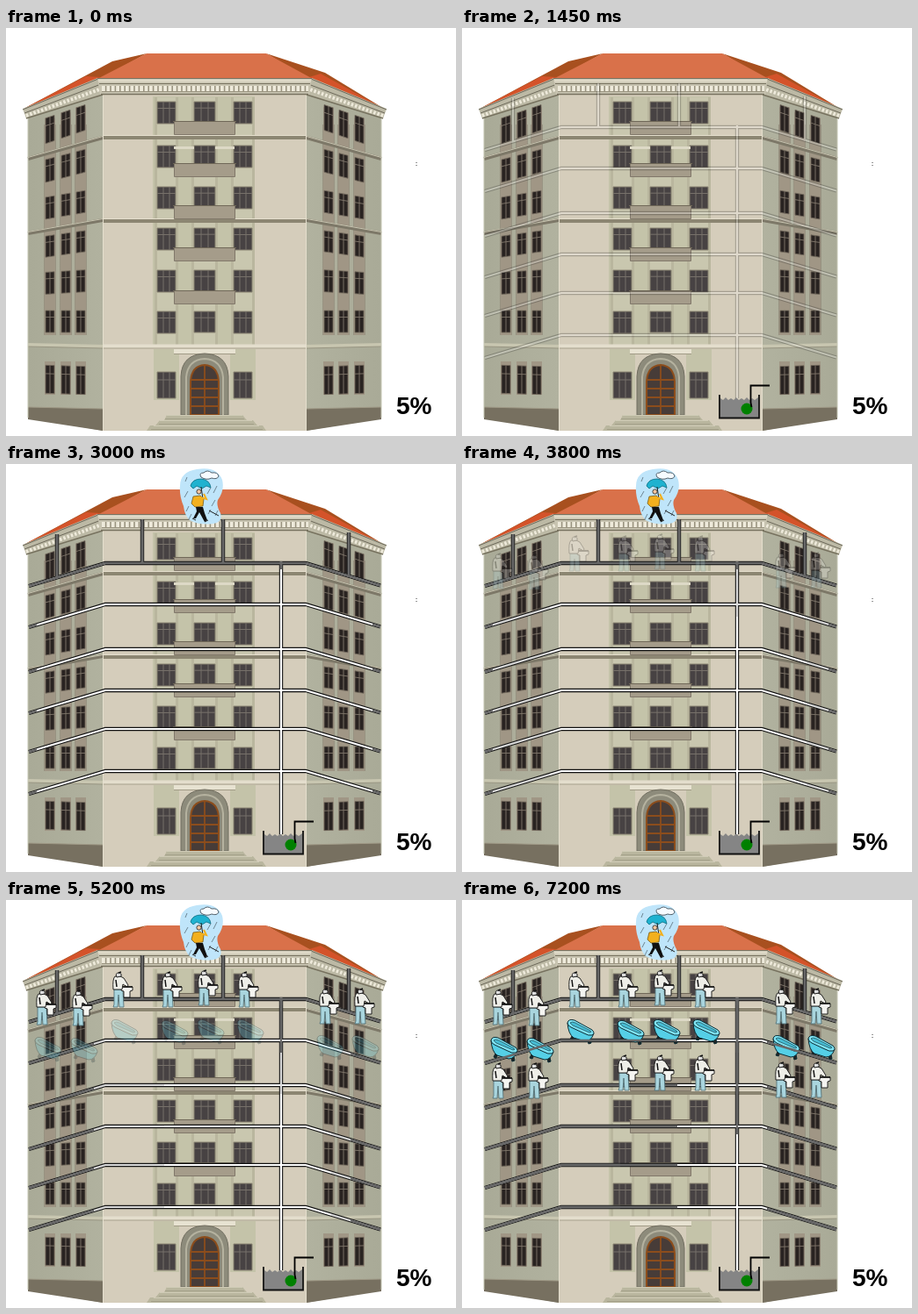
An HTML page for the animation above (8000 ms loop, 512 by 465 pixels).

```html
<!DOCTYPE html>
<html lang="en">
<head>
<meta charset="utf-8">
<title>Building drainage</title>
<style>
  html, body { margin: 0; width: 100%; height: 100%; overflow: hidden; background: #fff; }
  svg { display: block; width: 512px; height: 465px; }
  .layer { opacity: 0; animation: 8s linear infinite; }
  #tank { animation-name: tank; }
  #pipes { animation-name: pipes; }
  #rain { animation-name: rain; }
  #basins { animation-name: basins; }
  #baths { animation-name: baths; }
  #lower { animation-name: lower; }
  /* Each layer fades in with four hard steps, the first one at once. */
  @keyframes tank { 0% { opacity: 0 } 6.24% { opacity: 0; animation-timing-function: steps(4, start) } 8.74%, 100% { opacity: 1 } }
  @keyframes pipes { 0% { opacity: 0 } 18.115% { opacity: 0; animation-timing-function: steps(4, start) } 20.615%, 100% { opacity: 1 } }
  @keyframes rain { 0% { opacity: 0 } 29.99% { opacity: 0; animation-timing-function: steps(4, start) } 39.99%, 100% { opacity: 1 } }
  @keyframes basins { 0% { opacity: 0 } 47.49% { opacity: 0; animation-timing-function: steps(4, start) } 57.49%, 100% { opacity: 1 } }
  @keyframes baths { 0% { opacity: 0 } 64.99% { opacity: 0; animation-timing-function: steps(4, start) } 74.99%, 100% { opacity: 1 } }
  @keyframes lower { 0% { opacity: 0 } 82.49% { opacity: 0; animation-timing-function: steps(4, start) } 92.49%, 100% { opacity: 1 } }
  text { font: bold 28px "Liberation Sans", Arial, sans-serif; }
</style>
</head>
<body>
<svg viewBox="0 0 512 465" fill="none">
  <defs>
    <linearGradient id="wall"><stop stop-color="#a9aa97"/><stop offset="1" stop-color="#b1b29f"/></linearGradient>

    <g id="washer" stroke="#111" stroke-width=".9" stroke-linejoin="round">
      <path d="M-5 19L-5 36L-6 39L-1 39L0 25L1 39L6 39L5 19Z" fill="#a9d5de" stroke="#56757c"/>
      <path d="M3 16H16V20L13 21V28H6V21L3 20Z" fill="#f4f4f0"/>
      <path d="M-4 4Q-7 7-6 19H4L5 13L10 16L11 14L6 6L2 4Z" fill="#eeeee8"/>
      <path d="M-2 5Q-4 0 0 0Q4 0 3 4Z" fill="#ddd"/>
      <path d="M0 0L3-1M-3 8L-2 16M5 16H16" stroke-width="1.5"/>
    </g>

    <g id="bath" stroke="#0b2b33" stroke-linejoin="round">
      <path d="M-10 6L-12 10L-9 11L-7 7M8 11L9 15L12 14L11 9" fill="#222"/>
      <path d="M-15-9Q-14 4-8 8L5 12Q12 12 15 3Z" fill="#55cfe6"/>
      <path d="M-15-9Q-14-14-7-12L13-1Q17 3 13 5Q9 6 4 3L-11-4Q-15-6-15-9Z" fill="#7fe3f3"/>
      <path d="M-12-9Q-10-11-6-9L11 0Q13 2 10 2L-9-6Z" fill="#48bdd4" stroke-width=".6"/>
    </g>
  </defs>

  <!-- roof -->
  <path d="M160 29L121 38L20 92L104 60Z" fill="#a8501f"/>
  <path d="M296 29L363 51L432 93L348 60Z" fill="#a8501f"/>
  <path d="M91 55L24 90L104 63L107 56Z" fill="#d4532a"/>
  <path d="M358 52L428 91L348 63L345 56Z" fill="#d4532a"/>
  <path d="M160 29H296L351 59H102Z" fill="#d9714a"/>

  <g id="side">
    <path d="M25 96L110 70V459L25 444Z" fill="url(#wall)"/>
    <g id="sideWin"></g>
    <path d="M25 432L110 434V459L25 446Z" fill="#777060"/>
    <path d="M25 432L110 434" stroke="#a09a87"/>
    <path d="M25 149L110 125M25 234L110 219" stroke="#7d7868" stroke-width="4"/>
    <path d="M25 147.500L110 123.500M25 232.500L110 217.500" stroke="#c9c5b1"/>
    <path d="M25 361L110 363" stroke="#c8c6b0" stroke-width="4"/>
    <path d="M25 363L110 365" stroke="#989582"/>
    <path d="M19 92L104 57L110 60V76L23 103Z" fill="#bcb9a5"/>
    <path d="M19 93L105 58M21 97L108 64" stroke="#6d695a"/>
    <path d="M23 100L109 69" stroke="#eeeadb" stroke-width="4" stroke-dasharray="2.500 2"/>
    <path d="M23 103L110 76" stroke="#77725f" stroke-width="1.500"/>
    <path d="M25 103V444" stroke="#c6c7b4"/>
  </g>
  <use href="#side" transform="matrix(-1 0 0 1 452 0)"/>

  <!-- front -->
  <path d="M110 73H342V459H110Z" fill="#d5cdbb"/>
  <path d="M167 78H283V361H167Z" fill="#c4c3a9"/>
  <g id="frontWin"></g>
  <path d="M110 125H342M110 220H342" stroke="#8c8672" stroke-width="4"/>
  <path d="M110 122.500H342M110 217.500H342" stroke="#e5dfcd"/>
  <path d="M110 362.500H342" stroke="#e4decd" stroke-width="4"/>
  <path d="M110 365H342" stroke="#aaa48f"/>
  <path d="M104 57H348L345 76H107Z" fill="#c8c4b1"/>
  <path d="M104 57.500H348M106 63.500H346" stroke="#77725f"/>
  <path d="M105 60H347" stroke="#dfdac8" stroke-width="3"/>
  <path d="M109 69.500H344" stroke="#99937f" stroke-width="7"/>
  <path d="M109 69H344" stroke="#eeeadb" stroke-width="6" stroke-dasharray="3.800 1.600"/>
  <path d="M108 75.500H344" stroke="#77725f" stroke-width="1.500"/>
  <path d="M110.500 77V459M341.500 77V459" stroke="#e5dfce"/>
  <path d="M191 136.500H214M238 136.500H260" stroke="#ddd9c6" stroke-width="3"/>
  <g id="balconies" fill="#a59c8a" stroke="#81786a"></g>

  <!-- entrance -->
  <path d="M191 366H261V371H191Z" fill="#e7e2d1"/>
  <path d="M191 371.500H261" stroke="#a19b86"/>
  <path d="M199 441V397Q200 372 226 371Q252 372 253 397V441Z" fill="#8d8b7b" stroke="#716e60"/>
  <path d="M205 441V398Q207 378 226 377Q245 378 247 398V441" stroke="#b5b29f" stroke-width="2"/>
  <path d="M210 441V403Q211 385 226 384Q241 385 242 403V441Z" fill="#473c38" stroke="#8c4d1c" stroke-width="2"/>
  <path d="M226 384V441M210 401H242M210 411H242M210 421H242M210 431H242" stroke="#8c4d1c" stroke-width="1.800"/>
  <path d="M183 441H269L274 447H281L286 453H292L296 459H160L164 453H170L175 447H180Z" fill="#b9b69e"/>
  <path d="M183 441.500H269M175 447.500H280M168 453.500H288" stroke="#cfcbb6"/>
  <path d="M181 445.500H271M174 451.500H282M165 457.500H292" stroke="#a5a18b"/>

  <path d="M466 153.500H468M466 156.500H468" stroke="#999"/>
  <text x="444" y="439.500" fill="#000">5%</text>

  <g id="tank" class="layer">
    <path d="M294 422L297 424L300 421L303 424L306 422L309 424L312 421L315 424L318 422L321 424L324 421L327 424L330 422L333 424L337 421V444H294Z" fill="#858585"/>
    <path d="M293 418V444.500H338V418" stroke="#111" stroke-width="1.800"/>
    <circle cx="324" cy="434" r="6.500" fill="#008000"/>
    <path d="M329.500 432L328.500 427V407.500H350" stroke="#000" stroke-width="1.800"/>
  </g>

  <g id="pipes" class="layer"></g>

  <g id="rain" class="layer">
    <path d="M198 25Q198 9 217 6Q240 2 246 18Q249 30 241 41Q239 47 244 56Q247 66 236 68Q220 70 209 64Q203 58 202 48Q197 36 198 25Z" fill="#bfe5fa"/>
    <path d="M207 31L203 38M208 48L205 54M233 27L229 34M240 25L236 33M238 41L234 48M233 52L230 57M241 53L238 59M211 57L208 63M206 15L204 20" stroke="#6f8794"/>
    <path d="M222 15Q219 10 225 10Q229 6 234 10Q241 9 242 14Q240 18 234 16Q228 19 222 15Z" fill="#f6fbff" stroke="#53616b"/>
    <path d="M210 25Q212 17 222 17Q232 18 233 27L228 25L223 28L217 25L213 28Z" fill="#1fb2d0" stroke="#0a6c80" stroke-width=".8"/>
    <path d="M222 26L224 40" stroke="#222"/>
    <circle cx="219.500" cy="31.500" r="2.600" fill="#f3c6a0" stroke="#222" stroke-width=".8"/>
    <path d="M213 37L221 36L225 40L224 48L215 49L211 45Z" fill="#f2b01e" stroke="#6b4b08" stroke-width=".7"/>
    <path d="M221 38L228 40L225 34" stroke="#f2b01e" stroke-width="2"/>
    <path d="M216 49H224L226 56L229 64L226 66L220 55L216 62L213 62L217 54Z" fill="#111"/>
    <path d="M212 62L216 64M226 66L230 64M231 53L242 59" stroke="#222"/>
  </g>
  <g id="basins" class="layer"></g>
  <g id="baths" class="layer"></g>
  <g id="lower" class="layer"></g>
</svg>
<script>
  const add = (id, html) => document.getElementById(id).insertAdjacentHTML('beforeend', html);
  const line = (d, color, w) => `<path d="${d}" stroke="${color}" stroke-width="${w}"/>`;

  // Side windows: [top, height, slope] per storey.
  const storeys = [[95, 29, -.34], [144, 26, -.26], [189, 25, -.17], [234, 24, -.14],
                   [277, 25, -.06], [322, 25, 0], [385, 32, .03]];
  for (const x of [50, 68, 85]) {
    add('sideWin', `<path d="M${x - 6} ${120 - x * .35}H${x + 6}V350H${x - 6}ZM${x - 6} 380H${x + 6}V418H${x - 6}Z" fill="#a09685"/>`);
    add('sideWin', line(`M${x - 6.5} 110V350M${x + 6.5} 110V350`, '#8f8778', .7));
  }
  for (const [y, h, slope] of storeys) {
    const panes = [-18, 0, 17].map(x =>
      `<path d="M${x - 5} 0H${x + 5}V${h}H${x - 5}Z" fill="#292321" stroke="#756c5f" stroke-width=".8"/>` +
      line(`M${x} 0V${h}M${x - 5} ${h * .3}H${x + 5}`, '#80776b', .9)).join('');
    add('sideWin', `<g transform="matrix(1 ${slope} 0 1 68 ${y})">${panes}</g>`);
  }

  // Front windows and their surrounds.
  const pane = (x, y, w, h) => {
    add('frontWin', `<path d="M${x} ${y}h${w}v${h}h${-w}z" fill="#474243" stroke="#8a8473"/>` +
      line(`M${x + w / 3} ${y}v${h}M${x + w * 2 / 3} ${y}v${h}M${x} ${y + h * .3}h${w}`, '#77716a', 1));
  };
  for (const [x, w] of [[169, 27], [211, 30], [256, 27]])
    add('frontWin', `<path d="M${x} 79h${w}V361h${-w}z" fill="#b9b69e"/>` +
      `<path d="M${x + 3} 79h${w - 6}V361h${6 - w}z" fill="#c9c7af"/>`);
  for (const y of [84, 134, 181, 228, 276, 323]) {
    pane(172, y, 21, 25);
    pane(214, y, 24, 24);
    pane(259, y, 21, 25);
  }
  for (const x of [172, 259]) {
    add('frontWin', `<path d="M${x - 4} 366h29v58h-29z" fill="#c4c3a9"/>`);
    pane(x, 392, 21, 30);
  }
  for (const y of [106, 154, 202, 250, 299])
    add('balconies', `<path d="M191.500 ${y + .5}h69v15h-69z"/><path d="M190 ${y + .5}h72" stroke="#706858"/>`);

  // Pipes.
  const floorPipe = y => `M26 ${y + 26}L113 ${y}H341L426 ${y + 25.5}`;
  const topPipes = floorPipe(113) + 'M58 80V129M155 63V113M247 63V113M390 78V129';
  const floorPipes = [160, 211, 258, 302, 350].map(floorPipe).join('');
  const allPipes = topPipes + floorPipes + 'M313 111V422';
  add('pipes', line(allPipes, '#111', 4.4) + line(allPipes, '#fff', 2.2));

  // Stagnant water reaches inward from both ends and down the riser.
  const flood = (id, left, right, depth, extra = '') => add(id,
    `<clipPath id="${id}Clip"><path d="M0 0H${left}V465H0ZM${right} 0H512V465H${right}Z"/></clipPath>` +
    `<g clip-path="url(#${id}Clip)">${line(floorPipes, '#686868', 2.4)}</g>` +
    line(`${extra}M313 111V${depth}`, '#686868', 2.4));
  flood('rain', 35, 417, 120, topPipes);
  flood('basins', 100, 392, 174);
  flood('baths', 180, 370, 221);
  flood('lower', 245, 347, 267);

  const place = (id, shape, spots) => spots.forEach(([x, y]) =>
    add(id, `<use href="#${shape}" x="${x}" y="${y}"/>`));
  place('basins', 'washer', [[41, 103], [82, 104], [128, 83], [184, 83], [225, 81], [271, 83], [363, 102], [403, 102]]);
  place('baths', 'bath', [[48, 169], [89, 170], [135, 149], [192, 150], [233, 149], [278, 149], [369, 167], [409, 167]]);
  place('lower', 'washer', [[41, 187], [82, 187], [184, 178], [225, 178], [271, 178], [363, 186], [403, 186]]);
</script>
</body>
</html>
```
